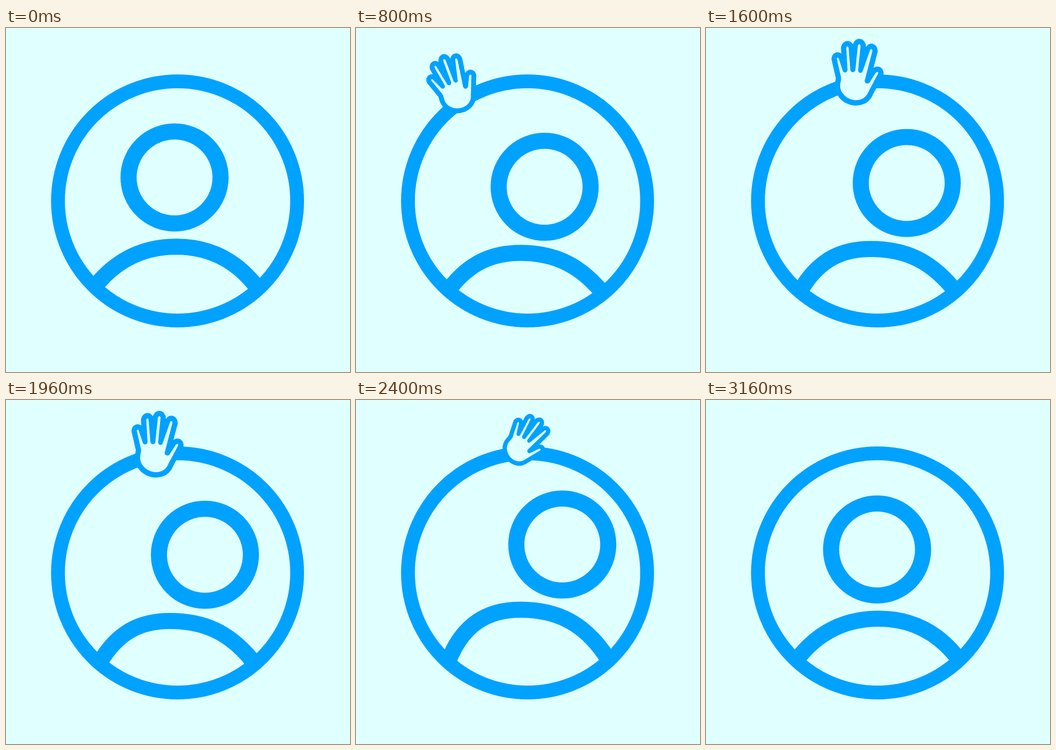
An HTML page that plays this animation: 748 by 748 pixels, repeating every 4080 ms.

```html
<!DOCTYPE html>
<html lang="en">
<head>
<meta charset="utf-8">
<title>Waving avatar</title>
<style>
  html, body { margin: 0; width: 100%; height: 100%; overflow: hidden; background: #e0ffff; }
  svg { display: block; width: 100vw; height: 100vh; }
  .line { fill: none; stroke: #00a2ff; }
  #hand { fill: #e0ffff; stroke: #00a2ff; stroke-width: 23; stroke-linejoin: round; paint-order: stroke; }
</style>
</head>
<body>
<svg viewBox="0 0 748 748">
  <clipPath id="inside"><circle cx="373" cy="376" r="260"/></clipPath>
  <g clip-path="url(#inside)"><path id="body" class="line" stroke-width="35"/></g>
  <circle id="head" class="line" r="100" stroke-width="35"/>
  <circle class="line" cx="373" cy="376" r="260" stroke-width="30"/>
  <g id="arm">
    <path id="hand" transform="translate(-322 -125)" d="
      M290 120 Q292 112 291 107 L281 68 Q282 63 285 67 L294 92
      C295 99 304 99 305 92 L301 44 Q303 37 306 43 L311 91
      C312 98 321 98 322 91 L326 39 Q329 31 332 38 L328 91
      C328 99 337 99 338 93 L353 47 Q357 42 358 49 L343 113
      C342 121 351 122 354 117 L366 97 Q371 91 372 97 L351 139
      Q344 157 322 157 Q304 155 295 142 Q288 133 290 120Z"/>
  </g>
</svg>
<script>
const LOOP = 4080, STEP = 40, MOVE_END = 3160;
const { sin, cos, tan, atan2, PI } = Math;
const rad = d => d * PI / 180;
const [head, body, arm] = ["head", "body", "arm"].map(id => document.getElementById(id));

// Smooth 0 to 1 between two times.
function ease(t, from, to) {
  const u = Math.min(1, Math.max(0, (t - from) / (to - from)));
  return u * u * (3 - 2 * u);
}
const pulse = (t, from, peak, to) => ease(t, from, peak) - ease(t, peak, to);
const wave = (t, peak, period) => cos(2 * PI * (t - peak) / period);

// All parts of the performance at one time, each about 0 to 1.
function acting(t) {
  const back = ease(t, 2440, 3100);
  const out = ease(t, 520, 1000) - back;
  return {
    back, out,
    hop: pulse(t, 0, 420, 660),
    leap: pulse(t, 2200, 2350, 2500),
    dip: pulse(t, 540, 720, 1000) + pulse(t, 2440, 2600, 2900),
    sway: out * wave(t, 1500, 600) * (1 - ease(t, 2100, 2320))
  };
}

function drawHead({ back, out, hop, leap, dip, sway }) {
  head.setAttribute("cx", 366.5 + 5.5 * back + 65 * out + 10 * sway + 23 * leap);
  head.setAttribute("cy", 325 + 11.5 * out + sway - 21 * hop - 30 * leap + 16 * dip);
}

// Half of the shoulder arc: its join with the ring and two handles.
function half(side, angle, tx, ty, bulge) {
  const x = 373 + side * 243 * sin(rad(angle));
  const y = 376 + 243 * cos(rad(angle));
  const dx = side * (x - tx);
  const slant = 2 * atan2(y - ty, dx);
  const reach = bulge * 4 / 3 * tan(slant / 4) * dx / sin(slant);
  const along = d => `${x - side * d * cos(slant)} ${y - d * sin(slant)}`;
  return { join: along(0), tail: along(-45), low: along(reach), top: `${tx + side * reach} ${ty}` };
}

function drawBody({ back, out, hop, leap, dip, sway }) {
  const tx = 370 + 5 * back - 14 * out + 4 * sway + 2 * leap - 6 * dip;
  const ty = 475.5 + 5 * out - 11.5 * hop - 33 * leap + 13 * dip;
  const leftAngle = 44.2 - back - 2.6 * out - .8 * sway + .9 * hop + 2 * leap - .7 * dip;
  const rightAngle = 42.8 + .7 * back - 2.4 * out + .9 * sway + .8 * hop + 4.3 * leap - 3 * dip;
  const bulge = 1.05 + .05 * out;
  const l = half(-1, leftAngle, tx, ty, bulge);
  const r = half(1, rightAngle, tx, ty, bulge);
  body.setAttribute("d", `M${l.tail} L${l.join} C${l.low} ${l.top} ${tx} ${ty}
    C${r.top} ${r.low} ${r.join} L${r.tail}`);
}

function drawHand(t, { leap }) {
  const scale = ease(t, 560, 850) - ease(t, 2340, 2560);
  arm.style.display = scale > .01 ? "" : "none";
  const swing = wave(t, 1060, 720);
  const lowered = 1 - ease(t, 600, 880);
  const x = 324 + 47 * swing;
  const y = 125 + 9 * swing * swing - 30 * leap;
  const tilt = 1.4 + 22 * swing + 23 * leap - 62 * lowered;
  // The arm turns up about the shoulder, then the hand waves.
  const a = rad(-96 * lowered), dx = x - 308, dy = y - 357;
  const px = 308 + dx * cos(a) - dy * sin(a);
  const py = 357 + dx * sin(a) + dy * cos(a);
  arm.setAttribute("transform", `translate(${px} ${py}) rotate(${tilt}) scale(${scale})`);
}

const start = performance.now();
function tick() {
  const time = (performance.now() - start) % LOOP;
  const t = Math.min(Math.floor(time / STEP) * STEP, MOVE_END);
  const pose = acting(t);
  drawHead(pose);
  drawBody(pose);
  drawHand(t, pose);
  requestAnimationFrame(tick);
}
tick();
</script>
</body>
</html>
```
